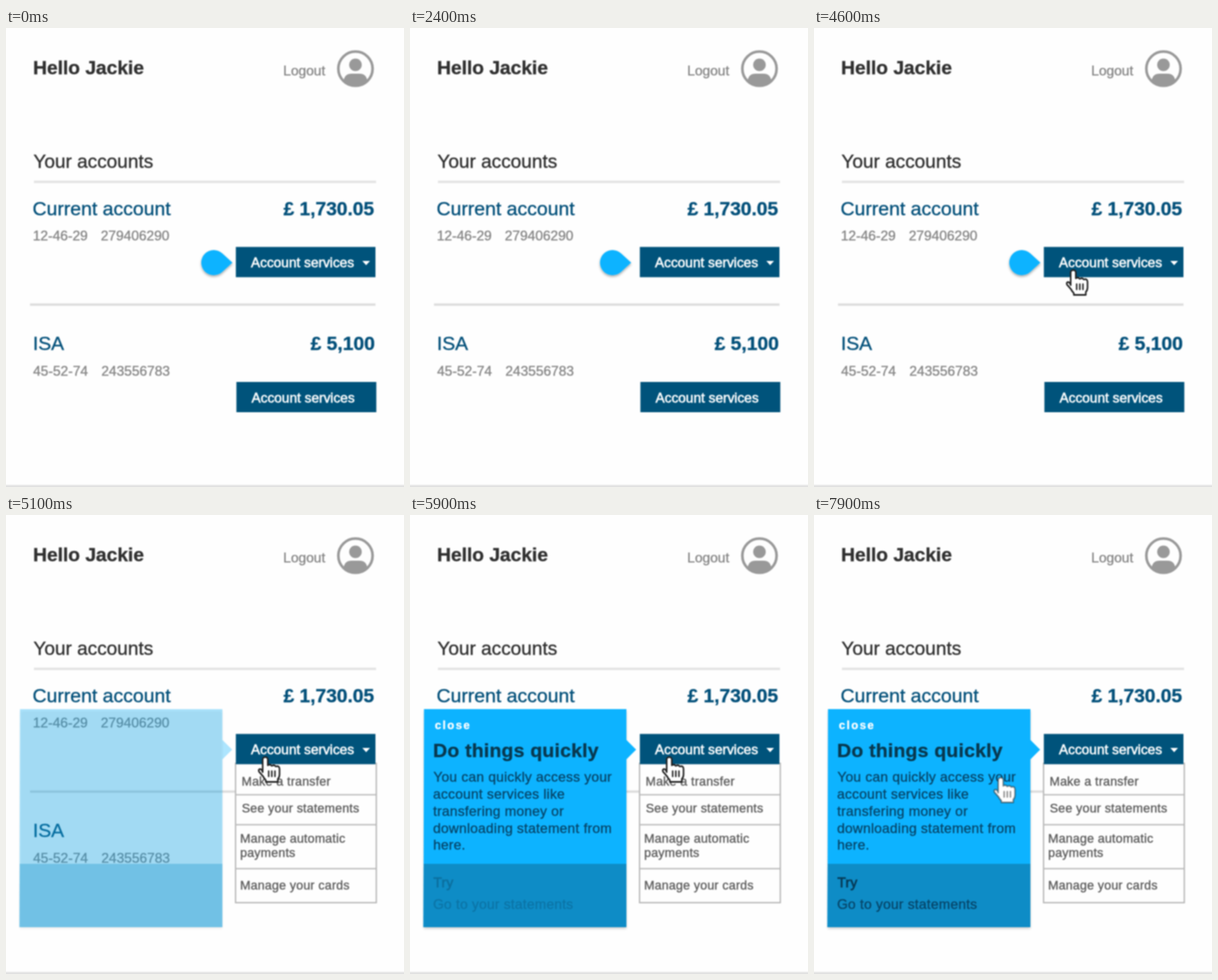
An HTML page for the animation above (8 s loop, 697x804 px).

```html
<!DOCTYPE html>
<html lang="en">
<head>
<meta charset="utf-8">
<title>Account overview</title>
<style>
  html, body { margin: 0; width: 100%; height: 100%; overflow: hidden; background: #fefefe; }
  svg { display: block; width: 697px; height: 804px; }
  text {
    font-family: "Liberation Sans", Arial, sans-serif; white-space: pre;
    fill: currentColor; stroke: currentColor; stroke-width: .5px;
  }
  .soft { filter: blur(.95px); }
  .bold { font-weight: bold; }
  .big { font-size: 34px; }
  .small { font-size: 24px; }
  .navy { color: #03507a; }
  .grey { color: #868686; }
  .dark { color: #303030; }
  .label { font-size: 23.9px; color: #fff; stroke-width: .8px; }
  .item { font-size: 21.7px; letter-spacing: .37px; color: #5c5c5c; }
  .note { font-size: 24px; letter-spacing: .45px; color: #07466a; }
</style>
</head>
<body>
<svg viewBox="0 0 697 804" xmlns="http://www.w3.org/2000/svg">
  <defs>
    <filter id="shade" x="-20%" y="-20%" width="140%" height="150%">
      <feDropShadow dx="0" dy="2.5" stdDeviation="2" flood-color="#000" flood-opacity=".35"/>
    </filter>
    <filter id="haze"><feGaussianBlur stdDeviation="2"/></filter>
    <clipPath id="face"><circle cx="612" cy="71.3" r="30"/></clipPath>
  </defs>
  <rect width="697" height="804" fill="#fefefe"/>
  <g class="soft">
    <!-- header -->
    <text class="bold dark" x="47.5" y="81" font-size="33.6">Hello Jackie</text>
    <text class="grey" x="485.5" y="83" font-size="24.1">Logout</text>
    <circle cx="612" cy="71.3" r="30" fill="#fefefe" stroke="#999" stroke-width="4.6"/>
    <g fill="#999" clip-path="url(#face)">
      <circle cx="612" cy="64.5" r="11"/>
      <path d="M591 104V93Q593 80 605 80H619Q631 80 633 93V104Z"/>
    </g>

    <!-- accounts -->
    <text class="dark" x="48" y="245" font-size="33.3">Your accounts</text>
    <rect x="49" y="267.5" width="599" height="4" fill="#e2e2e2"/>
    <text class="big navy" x="46.5" y="327.5">Current account</text>
    <text class="navy bold" x="486" y="327.5" font-size="33.6">£ 1,730.05</text>
    <text class="small grey" x="47" y="372">12-46-29</text>
    <text class="small grey" x="166" y="372">279406290</text>
    <rect x="42" y="482.5" width="605" height="4" fill="#dcdcdc"/>
    <text class="big navy" x="47" y="564">ISA</text>
    <text class="navy bold" x="533.5" y="564" font-size="33.7">£ 5,100</text>
    <text class="small grey" x="47.5" y="608.5">45-52-74</text>
    <text class="small grey" x="167" y="608.5">243556783</text>
    <rect x="403.5" y="620" width="245" height="53" fill="#00537b"/>
    <text class="label" x="430" y="656">Account services</text>
    <rect x="-5" y="800.5" width="707" height="9" fill="#e0e0e0"/>

    <!-- dropdown -->
    <g id="menu">
      <rect x="402" y="435" width="246.5" height="244" fill="#fefefe" stroke="#b5b5b5" stroke-width="2.3"/>
      <path d="M402 490H648M402 542.5H648M402 619.5H648" stroke="#bebebe" stroke-width="2.3"/>
      <text class="item" x="412.5" y="473.5">Make a transfer</text>
      <text class="item" x="413" y="521">See your statements</text>
      <text class="item" x="410" y="573.5">Manage automatic</text>
      <text class="item" x="410" y="598.5">payments</text>
      <text class="item" x="410" y="656">Manage your cards</text>
    </g>
    <rect x="402.5" y="383.5" width="244.5" height="53" fill="#00537b"/>
    <text class="label" x="429" y="419">Account services</text>
    <path d="M624 408H637.5L630.7 415.5Z" fill="#fff"/>

    <!-- pin -->
    <g id="pin">
      <path d="M396.5 411L379 427A22 22 0 1 1 379 395Z" fill="#0db3ff" filter="url(#shade)"/>
    </g>

    <!-- tip panel -->
    <path id="cast" d="M25 343H379V724.5H24Z" filter="url(#haze)"/>
    <path id="panel" d="M24.5 340H379V394L396 411L379 428V722H23.5Z" fill="#0db3ff"/>
    <path id="foot" d="M24 611H379V722H23.5Z" fill="#0e8cc6"/>
    <g id="words">
      <text class="bold" x="43.5" y="374.5" font-size="20" letter-spacing="2.5" color="#fff">close</text>
      <text class="big bold" x="40.5" y="424" letter-spacing=".4" color="#08384f">Do things quickly</text>
      <text class="note" x="41" y="466.5">You can quickly access your</text>
      <text class="note" x="40.5" y="496.5">account services like</text>
      <text class="note" x="40.5" y="526.5">transfering money or</text>
      <text class="note" x="40.5" y="556.5">downloading statement from</text>
      <text class="note" x="40.5" y="586">here.</text>
    </g>
    <g id="hint">
      <text class="note" x="41" y="652" style="color:#073a56;stroke-width:1.1px">Try</text>
      <text class="note" x="40.5" y="690">Go to your statements</text>
    </g>

    <!-- pointer, origin at the fingertip -->
    <g id="hand" fill="#fff" stroke="#222" stroke-width="2.8" stroke-linejoin="round" stroke-linecap="round">
      <path d="M-4.5 27V5a4.5 4.5 0 0 1 9 0V15q4-3 7 1q4-3 7 1q6-2 6.5 4V31q0 5-3 8V44H1V41q-3-3-5-7L-11 26q-1.5-4 2-4.5q3 0 4.5 5.5Z"/>
      <path d="M6 25V34.5M11.5 25V34.5M17 25V34.5" stroke-width="2.6"/>
    </g>
  </g>
</svg>
<script>
const LOOP = 8000, STEP = 100;
const el = id => document.getElementById(id);
const [menu, pin, cast, panel, foot, words, hint, hand] =
  ["menu", "pin", "cast", "panel", "foot", "words", "hint", "hand"].map(el);

const ramp = (t, a, b) => Math.min(1, Math.max(0, (t - a) / (b - a)));
const ease = (t, a, b) => { const p = ramp(t, a, b); return p * p * (3 - 2 * p); };
const fade = (node, v) => node.setAttribute("opacity", v);
const move = (node, x, y) => node.setAttribute("transform", `translate(${x} ${y})`);

// Three sideways swings, then a rest; played twice.
function nudge(t) {
  const p = t < 3400 ? (t % 1700) / 1300 : 1;
  return p < 1 ? 10.5 * Math.sin(3 * Math.PI * p) * (1 - .12 * p) : 0;
}

function draw(t) {
  move(pin, nudge(t), 0);
  fade(pin, 1 - ramp(t, 4700, 5000));
  fade(menu, ramp(t, 4600, 4900));

  const show = ramp(t, 5000, 5300);
  fade(cast, .2 * show);
  fade(panel, show);
  fade(foot, show);
  fade(words, ramp(t, 5300, 5600));
  fade(hint, ramp(t, 5800, 6100));

  // Each trip overshoots a little and settles back.
  const come = ease(t, 3500, 4400), rest = ease(t, 4400, 4600);
  const go = ease(t, 6600, 7500), settle = ease(t, 7500, 7900);
  const x = -487 * (1 - come) - 130 * go + 3 * settle;
  const y = 268.5 - 278.5 * come + 10 * rest + 45 * go - 9 * settle;
  move(hand, 454 + x, 423.5 + y);
  hand.setAttribute("stroke-opacity", 1 - .5 * go);
}

function tick() {
  draw(Math.floor(performance.now() % LOOP / STEP) * STEP);
  requestAnimationFrame(tick);
}
tick();
</script>
</body>
</html>
```
